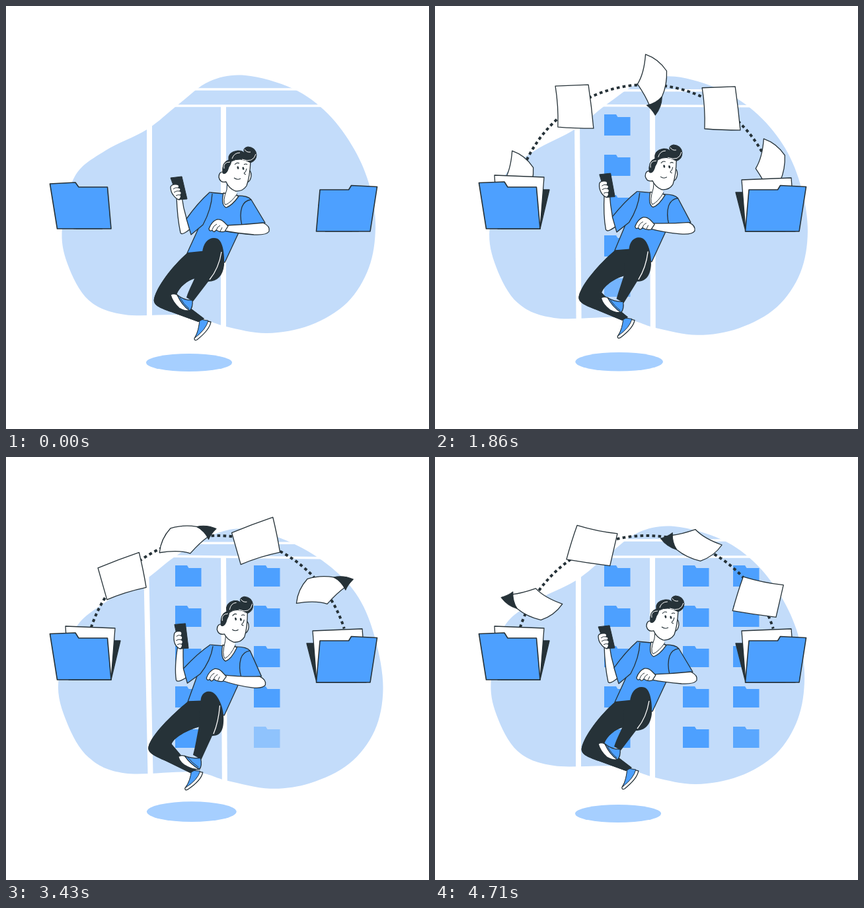
Animation of 640 by 640 pixels, one loop 4780 ms. Source, as an HTML page with a canvas:

```html
<!DOCTYPE html>
<html lang="en">
<head>
<meta charset="utf-8">
<title>File transfer</title>
<style>
html, body { margin: 0; width: 100%; height: 100%; overflow: hidden; background: #fff; }
canvas { display: block; width: 640px; height: 640px; }
</style>
</head>
<body>
<canvas id="stage" width="640" height="640"></canvas>
<script>
const LOOP = 4780;
const BLUE = '#4da0ff', PALE = '#c3dcfa', SHADE = '#a6cfff', INK = '#263238', WHITE = '#fff';
const ctx = document.getElementById('stage').getContext('2d');
ctx.lineJoin = 'round';

const clamp = v => Math.max(0, Math.min(1, v));
const mix = (a, b, k) => a + (b - a) * k;

function draw(d, fill, stroke, width = 1.3) {
  const path = new Path2D(d);
  if (fill) { ctx.fillStyle = fill; ctx.fill(path); }
  if (stroke) { ctx.strokeStyle = stroke; ctx.lineWidth = width; ctx.stroke(path); }
}

// Background: two resting outlines, blended by the sway amount
const blobA = [362,105, 434,125, 487,163, 527,217, 551,275, 559,335, 549,396, 516,449, 460,483, 395,495, 333,485,
  275,468, 180,467, 125,445, 93,390, 85,335, 104,258, 150,219, 213,187, 262,148, 308,114];
const blobB = [365,109, 434,131, 492,167, 534,213, 559,275, 571,350, 558,415, 519,465, 460,494, 400,502, 335,490,
  285,477, 180,479, 125,455, 92,402, 79,340, 104,261, 150,220, 211,185, 255,151, 313,118];
const bars = [
  [213,170, 213,500, 208,170, 215,500, 8],
  [325,150, 325,500, 325,150, 327,500, 8],
  [270,126, 460,126, 270,130.5, 460,130.5, 3.5],
  [235,151, 500,151, 235,150, 500,153, 3.5]
];

function smoothClosed(v) {
  const n = v.length;
  const at = i => v[(i + n) % n];
  let d = `M${v[0]},${v[1]}`;
  for (let i = 0; i < n; i += 2) {
    const c = j => [at(i + j) + (at(i + j + 2) - at(i + j - 2)) / 6, at(i + j + 1) + (at(i + j + 3) - at(i + j - 1)) / 6];
    const e = j => [at(i + j) - (at(i + j + 2) - at(i + j - 2)) / 6, at(i + j + 1) - (at(i + j + 3) - at(i + j - 1)) / 6];
    d += `C${c(0)} ${e(2)} ${at(i + 2)},${at(i + 3)}`;
  }
  return d + 'Z';
}

function drawBackground(sway) {
  draw(smoothClosed(blobA.map((a, i) => mix(a, blobB[i], sway))), PALE);
  for (const [x1, y1, x2, y2, X1, Y1, X2, Y2, w] of bars) {
    const o = w === 8 ? 4 : 0;
    draw(`M${mix(x1, X1, sway) + o},${mix(y1, Y1, sway)}L${mix(x2, X2, sway) + o},${mix(y2, Y2, sway)}`, null, WHITE, w);
  }
  ctx.fillStyle = SHADE;
  ctx.beginPath();
  ctx.ellipse(mix(277, 281, sway), mix(539.5, 536.5, sway), mix(65, 68, sway), mix(13.5, 15.5, sway), 0, 0, 7);
  ctx.fill();
}

// Small folders: x, middle of the first fade, delay per row
const columns = [[256, 623, 298], [375, 2010, 360], [451, 3700, 225]];

function drawSmallFolders(t) {
  for (const [x, first, step] of columns) {
    for (let row = 0; row < 5; row++) {
      ctx.globalAlpha = clamp((t - first - row * step) / 290 + 0.5);
      draw(`M${x},${164 + row * 61}h18l2.5,4h19v28h-39.5Z`, BLUE);
    }
  }
  ctx.globalAlpha = 1;
}

// Papers ride a circle while turning; values are the times they leave the left folder
const sheets = [-1150, -302, 556, 1380, 2342, 3113, 4117];
const curls = [-850, 133, 947, 1888, 2707, 3587, 4565];

function drawSheet() {
  draw('M-29,-30L21,-32Q26,2 29,34Q0,34 -25,32Q-24,0 -29,-30Z', WHITE, INK);
}
function drawCurl() {
  draw('M-10,-46Q10,-39 22,-21Q23,0 15,18Q6,31 -4,31Q-9,18 -22,-1Q-12,-17 -10,-46Z', WHITE, INK);
  draw('M-8,31Q6,28 15,18Q15,33 5,46Q-1,36 -8,31Z', INK, INK, 1);
}

function drawPapers(t) {
  const rad = Math.PI / 180;
  ctx.save();
  ctx.globalAlpha = clamp((t - 60) / 300);
  ctx.setLineDash([4.6, 4.4]);
  ctx.beginPath();
  ctx.arc(320, 320, 201, -162 * rad, -17.5 * rad);
  ctx.strokeStyle = INK;
  ctx.lineWidth = 4;
  ctx.stroke();
  ctx.setLineDash([]);
  ctx.beginPath();
  ctx.rect(0, 0, 640, 300);
  ctx.clip();
  for (const [starts, paint] of [[sheets, drawSheet], [curls, drawCurl]]) {
    for (const start of starts) {
      const angle = (t - start) * 0.0814 - 72;
      if (Math.abs(angle) > 88) continue;
      ctx.save();
      ctx.translate(320 + 201 * Math.sin(angle * rad), 320 - 201 * Math.cos(angle * rad));
      ctx.rotate((t - 1860) * 0.1632 * rad);
      paint();
      ctx.restore();
    }
  }
  ctx.restore();
}

function drawOpening(open, x, y, d, fill) {
  const s = mix(0.68, 1, open);
  ctx.save();
  ctx.translate(x, y);
  ctx.scale(s, s);
  ctx.translate(-x, -y);
  draw(d, fill, INK);
  ctx.restore();
}
function drawBacks(open) {
  drawOpening(open, 118, 337, 'M100,278H173L159,337H100Z', INK);
  drawOpening(open, 510, 341, 'M455,282H530V341H470Z', INK);
}
function drawFronts(open) {
  drawOpening(open, 118, 337, 'M90,256L165,259L159,337H95Z', WHITE);
  drawOpening(open, 510, 341, 'M464,263L539,260L545,341H470Z', WHITE);
  draw(`M66.5,${269 - 1.5 * open}L105,${267 - open}L110,274H153.5L159,337H77.5Z`, BLUE, INK, 1.6);
  draw('M475,278H518.5L522.5,271.5L561.5,273.5L551,341H469.5Z', BLUE, INK, 1.6);
}

// Man: drawn in one pose, bent by handles (x, y, dx, dy)
const bodyPins = [
  [368,214,-10,-5], [347,280,-7,-3], [326,258,-7,-1], [368,258,-8,-3], [334,305,-5,1], [310,282,-3,-1],
  [370,292,-6,-3], [398,339,-10,1], [350,345,-5,-1], [321,332,-8,-6], [273,322,-9,-5], [280,346,-10,-7],
  [249,259,2,-10], [274,292,-2,-6], [265,345,-11,-9], [274,374,-3,-7], [330,390,-5,0], [224,445,-13,-8],
  [286,412,2,-7], [258,437,-12,-6], [295,475,-17,-3], [310,478,-17,-4], [285,505,-19,-5]
];
const legPins = [
  [316,351,-12,1], [330,390,-5,1], [306,417,2,2], [287,408,1,-3], [276,440,6,7],
  [249,437,8,14], [282,445,9,8], [279,461,11,9]
];

const body = [
  // far leg and shoe
  ['M293,474L310,478Q308,490 289,505Q285,507 285,503Q293,491 293,474Z', WHITE, INK],
  ['M293,474L306,476Q303,489 286,502Q292,490 293,474Z', BLUE, INK, 1],
  ['M275,373C250,395 228,425 224,443C222,452 232,457 250,463L291,478L300,473L279,457L258,437C262,425 275,415 286,412L312,395L305,370Z', INK],
  // raised arm
  ['M258,288Q259,320 264,343Q266,348 279,337L273,321Q268,305 266,288Z', WHITE, INK],
  // shirt
  ['M308,282L329,284L351,287Q366,287 371,293L392,328L357,333L352,343L331,388L300,378L274,374L296,326Z', BLUE, INK],
  ['M308,282Q290,298 273,322L280,346L298,331Q311,307 312,284', BLUE, INK],
  ['M371,293Q361,294 357,304Q353,316 357,332', null, INK],
  ['M329,283Q325,301 333,305Q342,302 352,288L347,286Z', WHITE, INK],
  // phone and hand
  ['M249,260L266,258L274,292L261,293Z', INK, INK, 1],
  ['M249,274Q250,269 259,270Q263,271 261,275Q266,276 263,280Q267,282 264,286Q266,289 262,293Q257,292 253,286Q249,281 249,274Z', WHITE, INK],
  ['M253,277Q256,274 261,275M254,282Q258,279 263,280M257,287Q260,285 264,286', null, INK, 1],
  // resting arm and fist
  ['M332,332Q360,331 389,328Q400,333 398,341Q394,347 375,346Q350,344 329,340Z', WHITE, INK],
  ['M307,337Q311,326 319,323Q325,322 330,327L336,333L331,341Q324,343 318,339Q314,344 312,339Q308,342 307,337Z', WHITE, INK],
  ['M312,338Q314,332 319,330M318,340Q319,334 324,332M324,341L327,335', null, INK, 1],
  // head
  ['M335,264L334,278Q327,296 332,301Q341,297 349,285L348,275Z', WHITE],
  ['M335,268L334,278Q327,296 332,301Q341,297 350,284', null, INK, 1],
  ['M366,248Q371,248 371,257Q370,265 365,267Z', WHITE, INK],
  ['M336,236Q350,222 370,235Q369,258 364,272Q358,281 347,280Q337,276 333,266Q324,268 322,259Q322,250 330,251Z', WHITE, INK],
  ['M328,253Q326,236 337,233Q335,221 350,219Q356,218 361,222Q357,215 366,213Q378,214 379,225Q379,234 370,237Q354,228 341,235Q340,240 337,244Q334,256 328,253Z', INK, INK, 1],
  ['M330,246Q328,236 339,236M342,231Q345,222 354,222M357,232Q374,238 378,224M361,217Q364,222 370,221', null, WHITE, 1],
  ['M364,246Q363,251 361,252Q359,254 363,255M345,260Q350,264 355,261M346,240Q349,236 353,238M360,240Q363,238 365,240', null, INK, 1.1],
  ['M350,243Q352,242 352,246Q350,248 350,243ZM358,244Q360,243 360,247Q358,249 358,244Z', INK, INK, 1]
];
const nearLeg = [
  ['M297,374C298,355 310,348 320,352C328,356 331,375 330,392C328,408 320,417 306,417L283,447L273,441C277,428 285,414 287,408L288,385Z', INK],
  ['M326,372Q322,397 308,414', null, WHITE, 1.3],
  ['M249,437Q253,434 259,437Q268,453 279,460Q273,463 262,457Q252,448 249,437Z', WHITE, INK],
  ['M259,437Q270,446 282,445Q283,456 278,461Q266,453 259,437Z', BLUE, INK],
  ['M263,441Q269,452 277,458', null, INK, 1]
];

function bend(d, pins, k) {
  return d.replace(/([\d.]+),([\d.]+)/g, (_, a, b) => {
    const x = +a, y = +b;
    let sum = 0, sx = 0, sy = 0;
    for (const [px, py, dx, dy] of pins) {
      const w = 1 / ((x - px) ** 2 + (y - py) ** 2 + 20) ** 2;
      sum += w; sx += w * dx; sy += w * dy;
    }
    return `${x + k * sx / sum},${y + k * sy / sum}`;
  });
}

// Slow drift of the man: time, x, y
const drift = [[0, 0, 0], [1070, 0, 0], [1860, -1, -1], [2710, 0.5, -1], [3430, 4, 3], [3860, 2, 1], [4710, -2, -3], [LOOP, -2, -3]];

function drawMan(t, sway) {
  const i = drift.findIndex(p => p[0] > t);
  const [t0, x0, y0] = drift[i - 1], [t1, x1, y1] = drift[i];
  const k = (t - t0) / (t1 - t0);
  ctx.save();
  ctx.translate(mix(x0, x1, k), mix(y0, y1, k));
  for (const [parts, pins] of [[body.slice(0, 3), bodyPins], [body.slice(3, 8), bodyPins], [nearLeg, legPins], [body.slice(8), bodyPins]]) {
    for (const [d, ...style] of parts) draw(bend(d, pins, sway), ...style);
    if (parts.length === 5 && pins === bodyPins) draw(bend(body[2][0], bodyPins, sway), INK);
  }
  ctx.restore();
}

function render() {
  const t = performance.now() % LOOP;
  const sway = (1 - Math.cos(t / LOOP * 4 * Math.PI)) / 2;
  const open = 1 - (1 - clamp((t - 60) / 400)) ** 2;
  ctx.clearRect(0, 0, 640, 640);
  drawBackground(sway);
  drawSmallFolders(t);
  drawBacks(open);
  drawPapers(t);
  drawFronts(open);
  drawMan(t, sway);
  requestAnimationFrame(render);
}
render();
</script>
</body>
</html>
```
